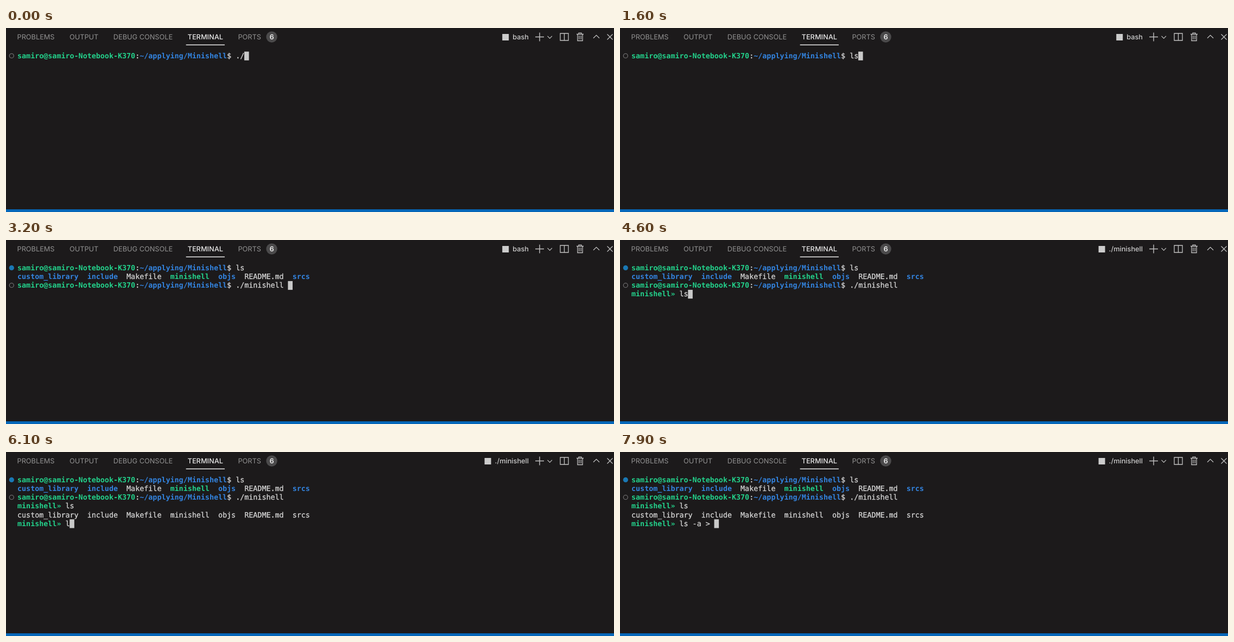
These frames come from a looping animation (1120 by 340 pixels, 8 s). An HTML page with a canvas:

```html
<!DOCTYPE html>
<html lang="en">
<head>
<meta charset="utf-8">
<title>Terminal session</title>
<style>
  html, body { margin: 0; width: 100%; height: 100%; overflow: hidden; background: #1c1a1b; }
  canvas { display: block; }
</style>
</head>
<body>
<canvas id="stage" width="1120" height="340"></canvas>
<script>
const ctx = document.getElementById('stage').getContext('2d');
const LOOP = 8000;
const COL = 8.043, LEFT = 21, ROW = 16.15, BASE = 56;
const MONO = '13.36px "DejaVu Sans Mono", monospace';
const UI = '12.75px Inter, sans-serif';
const GREEN = '#23d18b', BLUE = '#3384e0', WHITE = '#d4d4d4';
const ICON = '#c2c2c2', MID = 16.5;

const TABS = ['PROBLEMS', 'OUTPUT', 'DEBUG CONSOLE', 'TERMINAL', 'PORTS'];
const FILES = [
  ['custom_library', BLUE], ['include', BLUE], ['Makefile'], ['minishell', GREEN],
  ['objs', BLUE], ['README.md'], ['srcs', BLUE]
];
const PLAIN_FILES = FILES.map(([name]) => [name]);
const SHELL = [['samiro@samiro-Notebook-K370', GREEN], [':'], ['~/applying/Minishell', BLUE], ['$ ']];
const MINI = [['minishell» ', GREEN]];

// Input lines: shown at `start`, typed from `from` with one key every `step` ms
const LINES = [
  { start: 0, old: './', text: 'ls', from: 1400, step: 100, prompt: SHELL, output: FILES },
  { start: 1900, text: './minishell ', from: 2300, step: 75, prompt: SHELL },
  { start: 3800, text: 'ls', from: 4400, step: 100, prompt: MINI, output: PLAIN_FILES },
  { start: 5000, text: 'ls -a > ', from: 6100, step: 220, prompt: MINI }
];
const ERASE = 600;

const keys = (t, from, step) => Math.max(0, Math.floor((t - from) / step) + 1);

function label(text, x, y, color, font, align = 'left') {
  ctx.font = font;
  ctx.fillStyle = color;
  ctx.textAlign = align;
  ctx.fillText(text, x, y);
}

function path(width, color, trace) {
  ctx.strokeStyle = color;
  ctx.lineWidth = width;
  ctx.beginPath();
  trace();
  ctx.stroke();
}

function segment(x1, y1, x2, y2) {
  ctx.moveTo(x1, y1);
  ctx.lineTo(x2, y2);
}

function chevron(x, y, half, rise) {
  segment(x - half, y + rise / 2, x, y - rise / 2);
  ctx.lineTo(x + half, y + rise / 2);
}

function disc(x, y, r, fill) {
  ctx.beginPath();
  ctx.arc(x, y, r, 0, Math.PI * 2);
  ctx.fillStyle = fill;
  ctx.fill();
}

// Writes colored runs along a row and returns the next free column
function write(runs, row, gap = 0) {
  let col = 0;
  for (const [text, color] of runs) {
    const x = LEFT + col * COL, y = BASE + row * ROW;
    label(text, x, y, color || WHITE, (color ? 'bold ' : '') + MONO);
    if (!color) {
      ctx.lineWidth = 0.3;
      ctx.strokeStyle = WHITE;
      ctx.strokeText(text, x, y);
    }
    col += text.length + gap;
  }
  return col;
}

function drawTabs() {
  let x = 20.5;
  for (const name of TABS) {
    const active = name === 'TERMINAL';
    label(name, x, 21.3, active ? '#e8e8e8' : '#939393', (active ? '500 ' : '') + UI);
    const width = ctx.measureText(name).width;
    if (active) ctx.fillRect(x - 3, 30.5, width + 6, 1.5);
    x += width + 27.5;
  }
  disc(489.5, MID, 10.2, '#4b4a4b');
  label('6', 489.5, 21, '#eeeeee', '600 ' + UI, 'center');
}

function drawTools(title) {
  label(title, 963, 21.2, '#cccccc', '500 ' + UI, 'right');
  const left = 963 - ctx.measureText(title).width;
  ctx.fillRect(left - 19, MID - 5.5, 12, 12);

  path(1.4, ICON, () => {
    segment(975, MID, 991, MID);
    segment(983, MID - 8, 983, MID + 8);
  });
  path(1.2, ICON, () => {
    chevron(1001.7, MID + 0.5, 4.2, -4.2);
    chevron(1087.5, MID - 0.5, 5.5, 5.5);
    for (const d of [-5, 5]) segment(1112.5 - d, MID - 5, 1112.5 + d, MID + 5);
  });
  path(1.3, ICON, () => {
    ctx.rect(1021, MID - 6.5, 15, 13);
    segment(1028.5, MID - 6.5, 1028.5, MID + 6.5);
  });
  path(1.3, ICON, () => {
    const x = 1057.5;
    segment(x - 6.5, 11.5, x + 6.5, 11.5);
    ctx.rect(x - 2.5, 9.2, 5, 2.3);
    ctx.rect(x - 4.6, 11.5, 9.2, 12);
    for (const d of [-1.7, 1.7]) segment(x + d, 14, x + d, 21);
  });
}

function drawDot(row, done) {
  const y = 51.4 + row * ROW;
  if (done) disc(10.3, y, 4.6, '#1a78b4');
  else path(1.3, '#6c6b6c', () => ctx.arc(10.3, y, 4, 0, Math.PI * 2));
}

function drawSession(t) {
  let row = 0;
  LINES.forEach((line, i) => {
    if (t < line.start) return;
    const next = LINES[i + 1];
    const entered = next && t >= next.start;
    const kept = (line.old || '').slice(0, Math.max(0, 2 - keys(t, ERASE, 100)));
    const typed = line.text.slice(0, keys(t, line.from, line.step));
    const col = write([...line.prompt, [kept + typed]], row);

    if (!entered) {
      ctx.fillStyle = '#c9c9c9';
      ctx.fillRect(LEFT + col * COL - 0.3, BASE + row * ROW - 12.4, 8.6, 16.2);
    }
    if (line.prompt === SHELL) drawDot(row, entered && line.output);
    row++;
    if (line.output && entered) write(line.output, row++, 2);
  });
}

function draw(t) {
  ctx.fillStyle = '#1c1a1b';
  ctx.fillRect(0, 0, 1120, 340);
  ctx.fillStyle = '#0566b8';
  ctx.fillRect(0, 335, 1120, 5);
  drawTabs();
  drawTools(t < 4000 ? 'bash' : './minishell');
  drawSession(t);
}

function tick() {
  draw(performance.now() % LOOP);
  requestAnimationFrame(tick);
}

ctx.textRendering = 'geometricPrecision';
tick();
</script>
</body>
</html>
```
